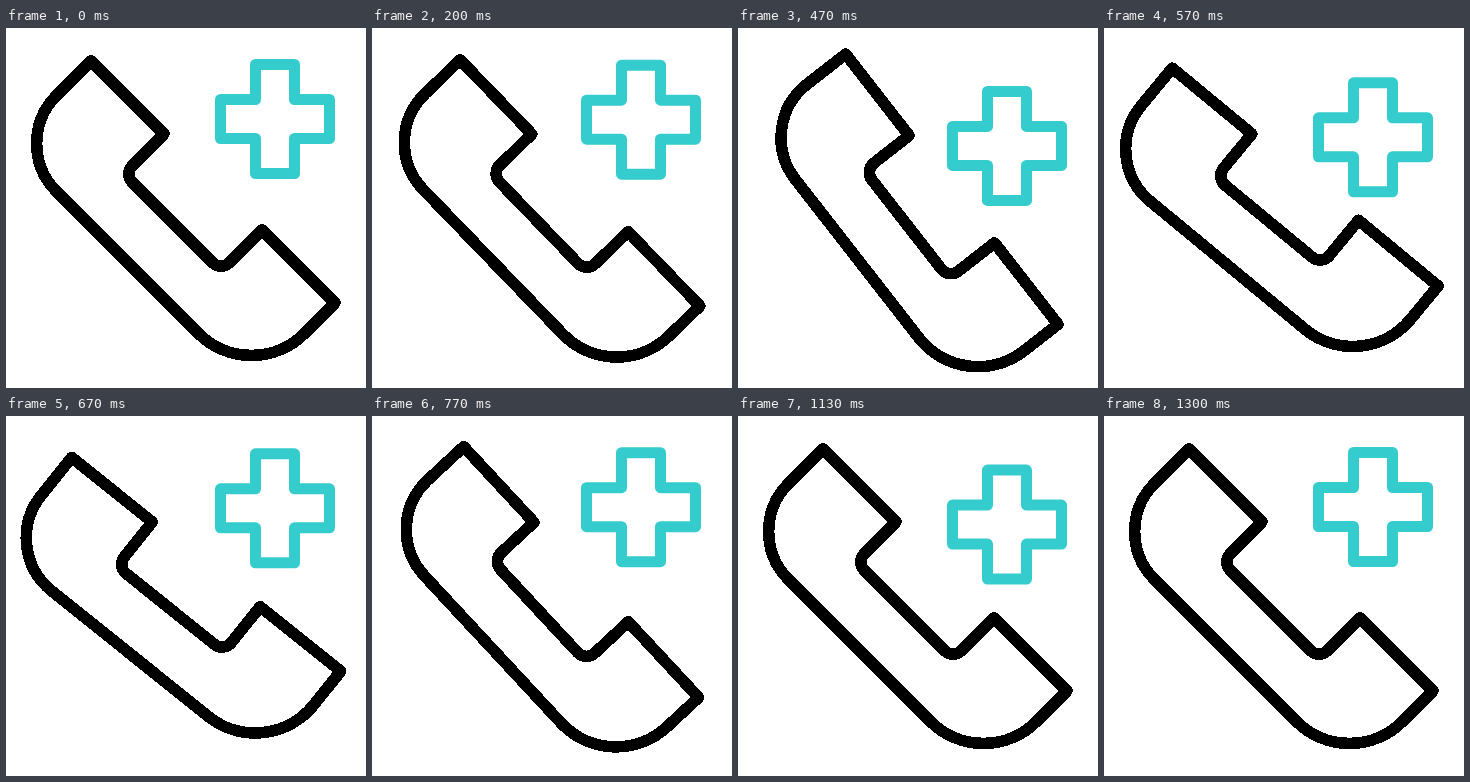
Write an HTML page that moves like this. It is 360x360 px and loops after 1670 ms.

```html
<!DOCTYPE html>
<html lang="en">
<head>
<meta charset="utf-8">
<title>Medical call</title>
<style>
  html, body { margin: 0; width: 100%; height: 100%; overflow: hidden; background: #fff; }
  svg { display: block; width: 360px; height: 360px; }
  path { fill: none; stroke-linejoin: round; }
  #phone { stroke: #000; stroke-width: 11.6; shape-rendering: crispEdges; }
  #cross { stroke: #35cccd; stroke-width: 11; }
</style>
</head>
<body>
<svg viewBox="0 0 360 360">
  <path id="phone" d="M85 33 L158 106 L126.5 137.5 A12 12 0 0 0 126.5 154.5
    L206.5 234.5 A12 12 0 0 0 223.5 234.5 L256 202 L329 275 L298.5 305.5
    A75 75 0 0 1 192.5 305.5 L50.5 163.5 A68 68 0 0 1 50.5 67.5 Z"/>
  <path id="cross" d="M249.5 36.5 h39 v35 h35 v39 h-35 v35 h-39 v-35 h-35 v-39 h35 Z"/>
</svg>
<script>
const phone = document.getElementById('phone');
const cross = document.getElementById('cross');
const LOOP = 1670;
const STEPS = 50;
const PIVOT = '152 213';

// [step, value] pairs, eased between neighbours
const SWING = [[4, 0], [11, 10.7], [19, -6.5], [24.6, 3], [29, 0]];
const BOB = [[4.4, 0], [13.2, 27], [22, 0], [30, 27], [39, 0]];

const ease = u => u < 0.5 ? 4 * u ** 3 : 1 - 4 * (1 - u) ** 3;

function valueAt(keys, step) {
  if (step <= keys[0][0]) return keys[0][1];
  for (let i = 1; i < keys.length; i++) {
    const [s0, v0] = keys[i - 1];
    const [s1, v1] = keys[i];
    if (step < s1) return v0 + (v1 - v0) * ease((step - s0) / (s1 - s0));
  }
  return keys[keys.length - 1][1];
}

function draw(now) {
  const step = Math.floor(((now % LOOP) + 5) / LOOP * STEPS) % STEPS;
  phone.setAttribute('transform', `rotate(${valueAt(SWING, step)} ${PIVOT})`);
  cross.setAttribute('transform', `translate(0 ${valueAt(BOB, step)})`);
}

const start = performance.now();
function tick() {
  draw(performance.now() - start);
  requestAnimationFrame(tick);
}
tick();
</script>
</body>
</html>
```
